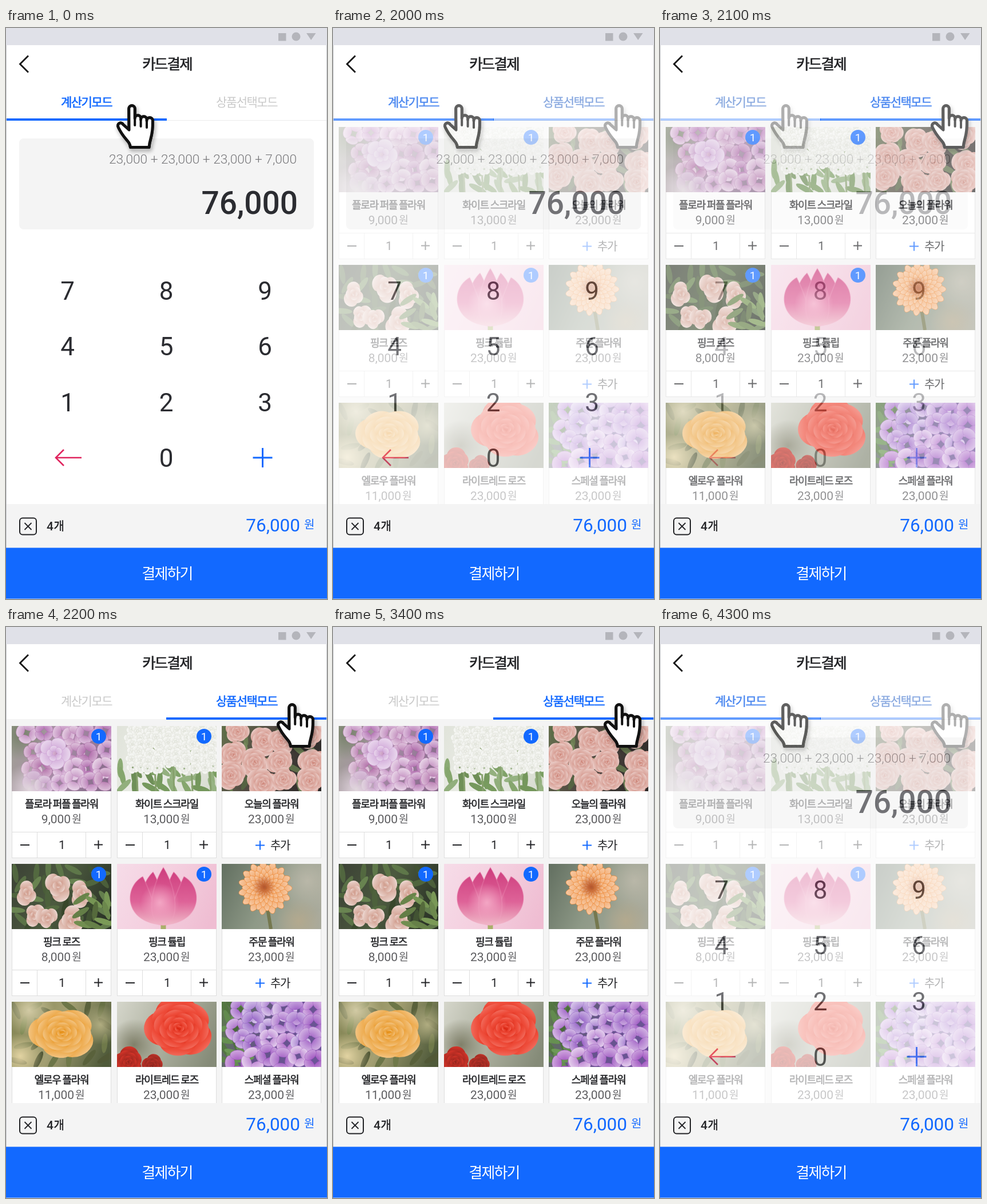
An HTML page with a canvas that plays this animation: 561x998 px, repeating every 4400 ms.

```html
<!DOCTYPE html>
<html lang="ko">
<head>
<meta charset="utf-8">
<title>카드결제</title>
<style>
  html, body { margin: 0; width: 100%; height: 100%; overflow: hidden; background: #fff; }
  canvas { display: block; width: 561px; height: 998px; }
</style>
</head>
<body>
<canvas id="stage" width="561" height="998"></canvas>
<script>
const W = 561, H = 998, TAU = Math.PI * 2;
const BLUE = '#1269ff', INK = '#222326', KEY = '#2b2c31', PALE = '#f4f4f4', FAINT = '#c9c9c9', EDGE = '#dedede';
const PHOTO_W = 174, PHOTO_H = 114;

let c; // context being painted

// ---------- helpers ----------
function rect(x, y, w, h, color) {
  c.fillStyle = color;
  c.fillRect(x, y, w, h);
}

function oval(x, y, rx, ry, color, turn = 0) {
  c.fillStyle = color;
  c.beginPath();
  c.ellipse(x, y, rx, ry, turn, 0, TAU);
  c.fill();
}

function line(points, color, width, cap = 'butt') {
  c.strokeStyle = color;
  c.lineWidth = width;
  c.lineCap = cap;
  c.lineJoin = 'miter';
  c.beginPath();
  points.forEach(([x, y]) => c.lineTo(x, y));
  c.stroke();
}

function plus(x, y, r, color, width) {
  line([[x - r, y], [x + r, y]], color, width);
  line([[x, y - r], [x, y + r]], color, width);
}

function cross(x, y, r, color, width) {
  line([[x - r, y - r], [x + r, y + r]], color, width);
  line([[x - r, y + r], [x + r, y - r]], color, width);
}

function digits(text, x, y, size, color, weight = 400, align = 'center') {
  c.font = `${weight} ${size}px Roboto, sans-serif`;
  c.letterSpacing = '0px';
  c.fillStyle = color;
  c.textAlign = align;
  c.fillText(text, x, y);
}

// A thin outline gives the medium weight.
function hangul(text, x, y, size, color, medium = false, align = 'center') {
  c.font = `${size}px "Noto Sans CJK KR", "Noto Sans CJK", sans-serif`;
  c.letterSpacing = -0.07 * size + 'px';
  c.fillStyle = c.strokeStyle = color;
  c.textAlign = align;
  c.fillText(text, x, y);
  if (!medium) return;
  c.lineWidth = size * 0.028;
  c.strokeText(text, x, y);
}

// ---------- flowers ----------
let seed = 1;
const random = () => (seed = seed * 16807 % 2147483647) / 2147483647;
const between = (a, b) => a + (b - a) * random();
const hsl = ([h, s, l], lift = 0) => `hsl(${h}, ${s}%, ${l + lift}%)`;

function wash(...colors) {
  const g = c.createLinearGradient(0, 0, PHOTO_W, PHOTO_H * 0.7);
  colors.forEach((color, i) => g.addColorStop(i / (colors.length - 1), color));
  rect(0, 0, PHOTO_W, PHOTO_H, g);
}

function glow(x, y, r, hex) {
  const g = c.createRadialGradient(x, y, 0, x, y, r);
  g.addColorStop(0, hex);
  g.addColorStop(1, hex + '00');
  oval(x, y, r, r, g);
}

// Calls draw at jittered grid places inside a part of the photo.
function scatter(cols, rows, draw, left = 0, top = 0, right = PHOTO_W, bottom = PHOTO_H) {
  for (let j = 0; j < rows; j++) for (let i = 0; i < cols; i++)
    draw(left + (i + between(0.25, 0.75)) * (right - left) / cols,
      top + (j + between(0.25, 0.75)) * (bottom - top) / rows);
}

const leafy = (cols, rows, tone, ...part) => scatter(cols, rows, (x, y) =>
  oval(x, y, 17, 5, hsl(tone, between(-10, 10)), between(0, 3)), ...part);

// Rings of separate petals, dark at the root and light at the rim.
function rosette(x, y, r, tone, rings, count, depth) {
  c.save();
  c.translate(x, y);
  c.rotate(random() * TAU);
  for (let i = 0; i < rings; i++) {
    const q = r * (1 - i / rings), mid = q * 0.62, half = q * 0.38;
    const g = c.createRadialGradient(0, 0, mid - half, 0, 0, mid + half);
    g.addColorStop(0, hsl(tone, -depth));
    g.addColorStop(1, hsl(tone, depth));
    for (let j = 0; j < count; j++) {
      c.rotate(TAU / count);
      oval(mid, 0, half, Math.PI * mid / count * 1.2, g);
      c.strokeStyle = hsl(tone, -depth * 1.5);
      c.lineWidth = 0.5;
      c.stroke();
    }
    c.rotate(Math.PI / count);
  }
  c.restore();
}

// Overlapping petals that wind inwards by the golden angle.
function rose(x, y, r, tone, depth, squash = 1, count = 22) {
  c.save();
  c.translate(x, y);
  c.scale(1, squash);
  c.rotate(random() * TAU);
  for (let i = 0; i < count; i++) {
    c.rotate(2.4);
    const q = r * (1 - i / count), mid = q * 0.5, size = q * 0.5 + r * 0.05;
    const g = c.createLinearGradient(mid - size, 0, mid + size, 0);
    g.addColorStop(0.3, hsl(tone, -depth * 1.6));
    g.addColorStop(0.8, hsl(tone));
    g.addColorStop(1, hsl(tone, depth));
    oval(mid, 0, size, size * 1.1, g);
  }
  c.restore();
}

const floret = ([h, s, l], size) => (x, y) =>
  rosette(x, y, size * between(0.85, 1.15), [h + between(-8, 8), s, l + between(-7, 7)], 1, 4, 9);

function lilac() {
  wash('#9fa193', '#a78da6', '#866b8a');
  glow(15, 15, 45, '#76806a');
  scatter(6, 4, floret([302, 30, 72], 18), 20);
  glow(30, 110, 45, '#e0d6dc');
  rosette(75, 48, 28, [290, 38, 82], 2, 5, 7);
}

function whiteStock() {
  wash('#e0e3da', '#eceee8', '#d9ddd2');
  leafy(8, 3, [95, 24, 54], 0, 68);
  for (let x = 32; x < PHOTO_W; x += 32) {
    line([[x, 30], [x + 4, PHOTO_H]], '#86a06c', 3);
    scatter(2, 6, (px, py) => rosette(px, py, 11, [75, 14, 93], 2, 5, 5), x - 15, 2, x + 15, between(62, 95));
  }
}

function roseBunch() {
  wash('#66704f', '#4f4640', '#2c2928');
  leafy(6, 4, [85, 20, 34]);
  scatter(4, 3, (x, y) => rose(x, y, between(21, 29), [9, 46, 77], 8));
}

function roseBuds() {
  wash('#3b4135', '#4c5a3f', '#2a3226');
  leafy(7, 5, [92, 24, 32]);
  scatter(3, 2, (x, y) => rose(x, y, between(19, 27), [14, 42, 81], 7, 1.1, 9), 8, 14, 135, 120);
  leafy(3, 3, [88, 28, 38], 115, 55);
}

function tulip() {
  const x = 81, base = 107;
  wash('#f6dce8', '#f4cfdf', '#efbdd2');
  line([[x, 95], [x, PHOTO_H]], '#a9b06a', 9);
  const g = c.createLinearGradient(0, 5, 0, base);
  g.addColorStop(0, '#cd3b7c');
  g.addColorStop(0.6, '#de6398');
  g.addColorStop(1, '#f0b9c8');
  for (const lean of [-0.5, 0.5, -1, 1, 0]) {
    const tip = x + lean * 36, low = x + lean * 38, high = x + lean * 48, top = 6 + Math.abs(lean) * 16;
    c.fillStyle = g;
    c.strokeStyle = '#f2a3c240';
    c.lineWidth = 2;
    c.beginPath();
    c.moveTo(x, base);
    c.bezierCurveTo(low - 32, base - 4, high - 22, 40, tip, top);
    c.bezierCurveTo(high + 22, 40, low + 32, base - 4, x, base);
    c.fill();
    c.stroke();
  }
  glow(x - 6, 68, 34, '#f3a6c4');
}

function dahlia() {
  wash('#626f60', '#8e9987', '#a9aa9c');
  glow(150, 30, 55, '#b9b7a8');
  glow(135, 100, 40, '#b3a98e');
  line([[80, 78], [86, PHOTO_H]], '#75784f', 6);
  rosette(76, 42, 47, [27, 84, 69], 7, 15, 12);
  glow(74, 40, 20, '#b4562e');
}

function yellowRose() {
  wash('#7f8150', '#a39f72', '#4f5a3a');
  leafy(6, 4, [72, 24, 34]);
  glow(30, 15, 45, '#d3cba5');
  glow(15, 95, 40, '#e2d3a2');
  glow(155, 40, 35, '#b0ac80');
  rose(88, 54, 58, [35, 82, 64], 9, 0.8, 30);
}

function redRose() {
  wash('#d5d6cb', '#aeb1a0', '#858b78');
  glow(30, 75, 45, '#80806a');
  rose(20, 106, 28, [4, 68, 44], 6);
  rose(62, 112, 20, [4, 65, 40], 6);
  rose(108, 46, 62, [6, 84, 58], 7, 0.85, 30);
}

function hydrangea() {
  wash('#5d7c48', '#64538a', '#6c5598');
  leafy(3, 6, [100, 28, 40], 0, 0, 45);
  scatter(6, 4, floret([277, 46, 72], 20), 18);
}

const products = [
  ['플로라 퍼플 플라워', '9,000', true, lilac],
  ['화이트 스크라일', '13,000', true, whiteStock],
  ['오늘의 플라워', '23,000', false, roseBunch],
  ['핑크 로즈', '8,000', true, roseBuds],
  ['핑크 튤립', '23,000', true, tulip],
  ['주문 플라워', '23,000', false, dahlia],
  ['엘로우 플라워', '11,000', false, yellowRose],
  ['라이트레드 로즈', '23,000', false, redRose],
  ['스페셜 플라워', '23,000', false, hydrangea],
];

// ---------- screen parts ----------
function photo(paint) {
  c.save();
  c.beginPath();
  c.rect(0, 0, PHOTO_W, PHOTO_H);
  c.clip();
  paint();
  c.restore();
}

function card([name, price, picked, paint], index) {
  const mid = PHOTO_W / 2;
  seed = 71 + index * 37;
  c.save();
  c.translate(Math.round(10 + index % 3 * 183.5), 173 + Math.floor(index / 3) * 241);
  rect(0, 0, PHOTO_W, 231, EDGE);
  rect(1, 1, PHOTO_W - 2, 229, '#fff');
  photo(paint);

  hangul(name, mid, 142.5, 18, INK, true);
  c.font = '21px Roboto, sans-serif';
  c.letterSpacing = '0px';
  const width = c.measureText(price).width, left = mid - (width + 19) / 2;
  digits(price, left, 170, 21, '#5c5c5f', 400, 'left');
  hangul('원', left + width + 2, 169, 18, '#5c5c5f', false, 'left');

  rect(0, 185, PHOTO_W, 1, EDGE);
  if (picked) {
    rect(44, 185, 1, 45, EDGE);
    rect(129, 185, 1, 45, EDGE);
    line([[15, 208], [31, 208]], INK, 2);
    plus(151.5, 207.5, 7.5, INK, 2);
    digits('1', mid + 1, 215, 21, INK);
    oval(152, 18, 13, 13, BLUE);
    digits('1', 152, 25, 19, '#fff');
  } else {
    plus(67, 208.5, 8, BLUE, 2);
    hangul('추가', 85, 216, 20, INK, false, 'left');
  }
  c.restore();
}

function hand(dx) {
  const r = 5.2, fingers = [0, 1, 2, 3].map(i => [220 + i * r * 2, i ? 156 + i * 2 : 141]);
  const shape = new Path2D();
  shape.moveTo(215, 178);
  fingers.forEach(([x, y]) => shape.arc(x, y, r, Math.PI, TAU));
  shape.bezierCurveTo(257, 192, 251, 192, 250, 208.5);
  shape.lineTo(217.5, 208.5);
  shape.bezierCurveTo(216, 196, 207, 196, 196.5, 174);
  shape.bezierCurveTo(193, 167, 201, 163, 205, 169);
  shape.closePath();

  c.save();
  c.translate(dx, 0);
  c.lineJoin = 'round';
  c.fillStyle = '#fff';
  c.strokeStyle = '#111';
  c.lineWidth = 5;
  c.shadowColor = 'rgba(0,0,0,.4)';
  c.shadowBlur = 7;
  c.shadowOffsetX = 2;
  c.shadowOffsetY = 4;
  c.stroke(shape);
  c.shadowColor = 'transparent';
  c.fill(shape);
  c.stroke(shape);
  for (const [x, y] of fingers.slice(1)) line([[x - r, y], [x - r, y + 12]], '#111', 4, 'round');
  c.restore();
}

function header(active) {
  rect(0, 0, W, 30, '#e0e1e8');
  rect(476, 9, 13.5, 13.5, '#b4b5bb');
  oval(507, 15, 7.5, 7.5, '#b4b5bb');
  c.beginPath();
  c.moveTo(525, 9);
  c.lineTo(541.5, 9);
  c.lineTo(533.2, 21);
  c.fill();

  line([[39, 48.5], [24.5, 63], [39, 77.5]], '#111', 2.8);
  hangul('카드결제', 281.5, 71.5, 25.5, INK, true);
  ['계산기모드', '상품선택모드'].forEach((label, i) =>
    hangul(label, 140.5 + i * 280, 136.5, 21, i === active ? BLUE : FAINT, i === active));
  rect(active * 280, 158, 281, 4, BLUE);
}

function footer() {
  rect(0, 832, W, 77, PALE);
  c.strokeStyle = INK;
  c.lineWidth = 2;
  c.beginPath();
  c.roundRect(24, 856.5, 29, 29, 5);
  c.stroke();
  cross(38.5, 871, 6, INK, 1.8);
  digits('4', 71, 878, 21, INK, 500, 'left');
  hangul('개', 83.5, 878, 20, INK, true, 'left');
  digits('76,000', 514, 880, 31.5, BLUE, 400, 'right');
  hangul('원', 521, 875, 20, BLUE, false, 'left');
  for (const x of [0, W - 1]) rect(x, 30, 1, H - 30, '#c9cacf');
  rect(0, 908.5, W, 89, BLUE);
  hangul('결제하기', 281.5, 963, 26, '#fff');
}

function calculator() {
  rect(0, 0, W, H, '#fff');
  rect(0, 161, W, 1, '#ececec');
  header(0);
  c.fillStyle = PALE;
  c.beginPath();
  c.roundRect(23, 193, 515, 159, 8);
  c.fill();
  digits('23,000 + 23,000 + 23,000 + 7,000', 508, 237, 22.7, '#77777a', 300, 'right');
  digits('76,000', 510, 324.5, 55, KEY, 500, 'right');

  ['789', '456', '123', ' 0 '].forEach((row, j) => [...row].forEach((key, i) =>
    digits(key, 107.5 + i * 172.5, 475 + j * 97.3, 44, KEY)));
  const red = '#e0245e';
  line([[132, 751], [87, 751]], red, 2.6);
  line([[101, 737], [87, 751], [101, 765]], red, 2.6);
  plus(448.5, 751, 17, BLUE, 3);
  footer();
  hand(0);
}

function shop() {
  rect(0, 0, W, H, '#fff');
  rect(0, 161, W, 671, PALE);
  header(1);
  products.forEach(card);
  footer();
  hand(280);
}

function render(paint) {
  const layer = document.createElement('canvas');
  layer.width = W;
  layer.height = H;
  c = layer.getContext('2d');
  paint();
  return layer;
}

// ---------- playback ----------
const HALF = 2200, HOLD = 2000, STEP = 100;
const stage = document.getElementById('stage').getContext('2d');
const back = render(calculator), front = render(shop);
const start = performance.now();

// Each half holds one screen, then crosses to the other in thirds.
function frontAlpha(t) {
  const time = t % HALF;
  const crossed = time < HOLD ? 0 : (Math.floor((time - HOLD) / STEP) + 1) / 3;
  return t % (2 * HALF) < HALF ? crossed : 1 - crossed;
}

function play() {
  stage.globalAlpha = 1;
  stage.drawImage(back, 0, 0);
  stage.globalAlpha = frontAlpha(Math.max(0, performance.now() - start));
  stage.drawImage(front, 0, 0);
  requestAnimationFrame(play);
}
play();
</script>
</body>
</html>
```
